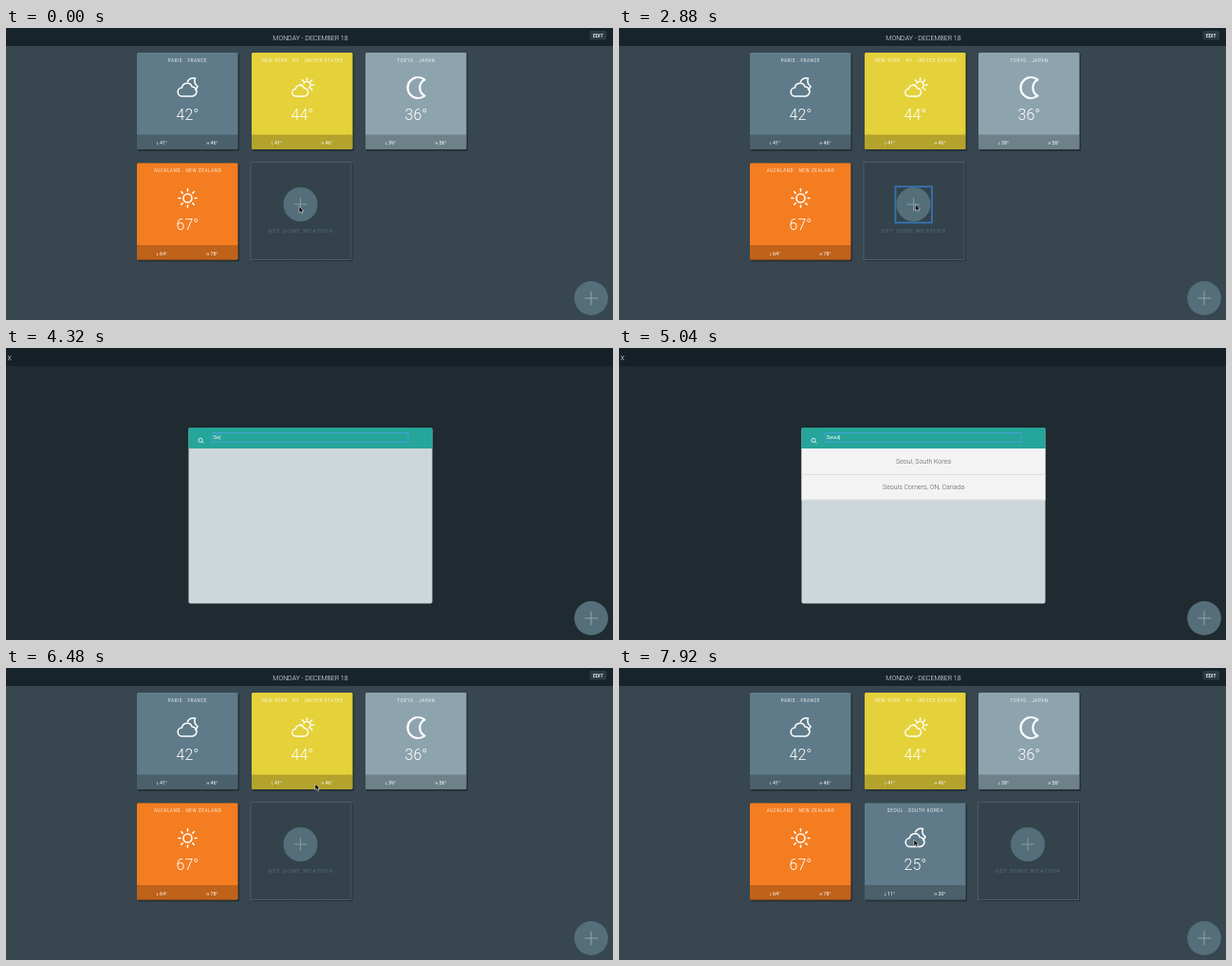
Write an HTML page that moves like this. It is 640 by 308 pixels and loops after 8 s.

```html
<!DOCTYPE html>
<html lang="en">
<head>
<meta charset="utf-8">
<title>Weather board</title>
<style>
  html, body { margin: 0; width: 100%; height: 100%; overflow: hidden; background: #37464f; }
  svg { display: block; width: 100vw; height: 100vh; }
  text { font: 300 7px Roboto, sans-serif; fill: #fff; }
  .mid { text-anchor: middle; }
  .title { font-size: 4.6px; letter-spacing: .6px; font-weight: 400; fill-opacity: .88; }
  .temp { font-size: 16px; }
  .range { font-size: 5.4px; font-weight: 400; }
  .range .tag { font-size: 4px; }
  .hint { font-size: 6px; letter-spacing: .7px; font-weight: 400; fill: #546a75; }
  .edit { font-size: 5px; font-weight: 500; }
  .row { fill: #555; }
  .entry { font: 5.2px "Liberation Sans", Arial, sans-serif; }
  .icon { fill: none; stroke: #fff; stroke-width: 1.6; stroke-linecap: round; stroke-linejoin: round; }
</style>
</head>
<body>
<svg viewBox="0 0 640 308" preserveAspectRatio="none">
  <rect width="640" height="308" fill="#37464f"/>
  <g id="board">
    <rect width="640" height="19" fill="#17242b"/>
    <text class="mid" x="321" y="12.5">MONDAY - DECEMBER 18</text>
    <rect x="615.5" y="3" width="17.5" height="9.5" rx="1.5" fill="#2d3b43"/>
    <text class="edit mid" x="624.2" y="9.7">EDIT</text>
    <g id="cards"></g>
    <g id="slot">
      <rect x=".5" y=".5" width="106" height="103" fill="#34434b" stroke="#71818a" stroke-width=".8" stroke-dasharray="1 1"/>
      <path d="M107.5 1.5V104.5H1.5" fill="none" stroke="#000" stroke-opacity=".3"/>
      <circle cx="53" cy="45" r="18" fill="#546e7a"/>
      <path d="M46 45H60M53 38V52" stroke="#8199a4" stroke-width="1"/>
      <text class="hint mid" x="53.3" y="75">GET SOME WEATHER</text>
      <rect id="ring" x="34" y="26.3" width="38.5" height="38" fill="none" stroke="#3674b4" stroke-width="1.8"/>
    </g>
  </g>
  <g id="modal">
    <rect width="640" height="308" fill="#1f2b30"/>
    <rect width="640" height="19" fill="#162127"/>
    <text x="1.6" y="12.5">X</text>
    <rect x="192.5" y="84" width="257" height="185.5" rx="2" fill="#cdd7d9"/>
    <path d="M192.5 106V86a2 2 0 0 1 2-2H447.500a2 2 0 0 1 2 2V106Z" fill="#26a59a"/>
    <g fill="none" stroke="#fff" stroke-width=".8">
      <circle cx="205" cy="97.300" r="2.100"/>
      <path d="M206.600 98.900L208.300 100.600"/>
    </g>
    <rect x="217.500" y="89.500" width="206.500" height="9.800" fill="none" stroke="#4aa3dc" stroke-width=".9"/>
    <text id="entry" class="entry" x="218.800" y="96.300"></text>
    <g id="hits">
      <rect x="192.500" y="106" width="257" height="54.300" fill="#f3f3f3"/>
      <path d="M192.500 133.500H449.500M192.500 160.200H449.500" stroke="#d9dcdc" stroke-width=".8"/>
      <text class="row mid" x="321" y="122">Seoul, South Korea</text>
      <text class="row mid" x="321" y="149.300">Seouls Corners, ON, Canada</text>
    </g>
  </g>
  <circle cx="617" cy="285" r="17.900" fill="#546e7a"/>
  <path d="M609.700 285H624.300M617 277.700V292.300" stroke="#8fa4ae" stroke-width="1.100"/>
  <path id="cursor" d="M0 0V6.800L1.600 5.400L2.700 7.900L3.900 7.400L2.800 5H4.900Z" fill="#000" stroke="#fff" stroke-width=".5"/>
</svg>
<script>
const $ = id => document.getElementById(id);

const rays = (cx, cy, r1, r2, from, to) => {
  let d = '';
  for (let a = from; a <= to; a += 45) {
    const c = Math.cos(a * Math.PI / 180), s = Math.sin(a * Math.PI / 180);
    d += `M${cx + r1 * c} ${cy + r1 * s}L${cx + r2 * c} ${cy + r2 * s}`;
  }
  return `<path d="${d}"/>`;
};

const cloud = '<path d="M-5.5 9a4.500 4.500 0 0 1-.6-9a5.600 5.600 0 0 1 10.800-1a5 5 0 0 1-.4 10Z"/>';
const icons = {
  cloudMoon: cloud + '<path d="M0-6.500a7.500 7.500 0 0 1 8-3.500a6.500 6.500 0 0 0 2.600 8.600a6 6 0 0 1-2.600 3.200"/>',
  cloudSun: `<g transform="translate(-2 1.300) scale(.85)">${cloud}</g>
    <path d="M1.500-4.800a3.900 3.900 0 1 1 5.800 5"/>` + rays(5, -3, 5.8, 7.3, -180, 45),
  moon: '<path stroke-width="2.200" d="M9-8.500A11 11 0 1 0 9 8.500A9.600 9.600 0 0 1 9-8.500Z"/>',
  sun: '<circle r="4.500"/>' + rays(0, 0, 7.6, 9.6, 0, 315)
};

const cards = [
  [138, 26, '#5f7b89', 'PARIS . FRANCE', 'cloudMoon', 42, 41, 46],
  [259, 26, '#e5d13a', 'NEW YORK . NY . UNITED STATES', 'cloudSun', 44, 41, 46],
  [379, 26, '#8da4ae', 'TOKYO . JAPAN', 'moon', 36, 39, 56],
  [138, 142.5, '#f47d21', 'AUCKLAND . NEW ZEALAND', 'sun', 67, 64, 78],
  [259, 142.5, '#5f7b89', 'SEOUL . SOUTH KOREA', 'cloudMoon', 25, 11, 30]
];

const range = (x, tag, n) =>
  `<text class="range" x="${x}" y="97"><tspan class="tag">${tag} </tspan>${n}°</text>`;

$('cards').innerHTML = cards.map(([x, y, color, place, icon, now, low, high]) => `
  <g transform="translate(${x} ${y})">
    <rect x="1" y="1.300" width="107" height="102.500" rx="1.500" fill="#000" opacity=".35"/>
    <rect width="106.500" height="102" rx="1.500" fill="${color}"/>
    <path d="M0 86.500H106.500V100.500a1.500 1.500 0 0 1-1.500 1.500H1.500a1.500 1.500 0 0 1-1.500-1.500Z" fill="#000" opacity=".22"/>
    <text class="title mid" x="53.500" y="9.800">${place}</text>
    <g class="icon" transform="translate(53.500 37)">${icons[icon]}</g>
    <text class="temp mid" x="53.500" y="70.600">${now}°</text>
    ${range(20.800, 'L', low)}${range(73.600, 'H', high)}
  </g>`).join('');
const newCard = $('cards').lastElementChild;

const LOOP = 8000, STEP = 80;
const OPEN = 2960, CLOSE = 6480, ADDED = 6960, HITS = 4800;
const keys = [4160, 4320, 4480, 4640, 4800];
const hidden = [4080, 5600];
// time, x, y of the pointer tip
const path = [
  [0, 309, 188], [2640, 309, 188], [2800, 312.5, 186], [3120, 312.5, 186],
  [3680, 300, 94], [5600, 300, 94], [6080, 326, 122], [6560, 326, 122],
  [7280, 311, 181], [8000, 311, 181]
];

const pointer = t => {
  const i = path.findIndex(p => p[0] > t);
  const [t0, x0, y0] = path[i - 1], [t1, x1, y1] = path[i];
  const k = (t - t0) / (t1 - t0), e = k * k * (3 - 2 * k);
  return [x0 + (x1 - x0) * e, y0 + (y1 - y0) * e];
};

const show = (el, on) => { el.style.display = on ? '' : 'none'; };

function draw() {
  const t = Math.floor(performance.now() % LOOP / STEP) * STEP;
  const open = t >= OPEN && t < CLOSE, added = t >= ADDED;
  show($('board'), !open);
  show($('modal'), open);
  show($('hits'), t >= HITS);
  show($('ring'), t >= 2800 && t < OPEN);
  show(newCard, added);
  $('slot').setAttribute('transform', `translate(${added ? 378 : 257.5} 141)`);
  const typed = 'Seoul'.slice(0, keys.filter(k => k <= t).length);
  $('entry').textContent = typed && typed + '|';
  show($('cursor'), t < hidden[0] || t >= hidden[1]);
  $('cursor').setAttribute('transform', `translate(${pointer(t)})`);
  requestAnimationFrame(draw);
}
draw();
</script>
</body>
</html>
```
